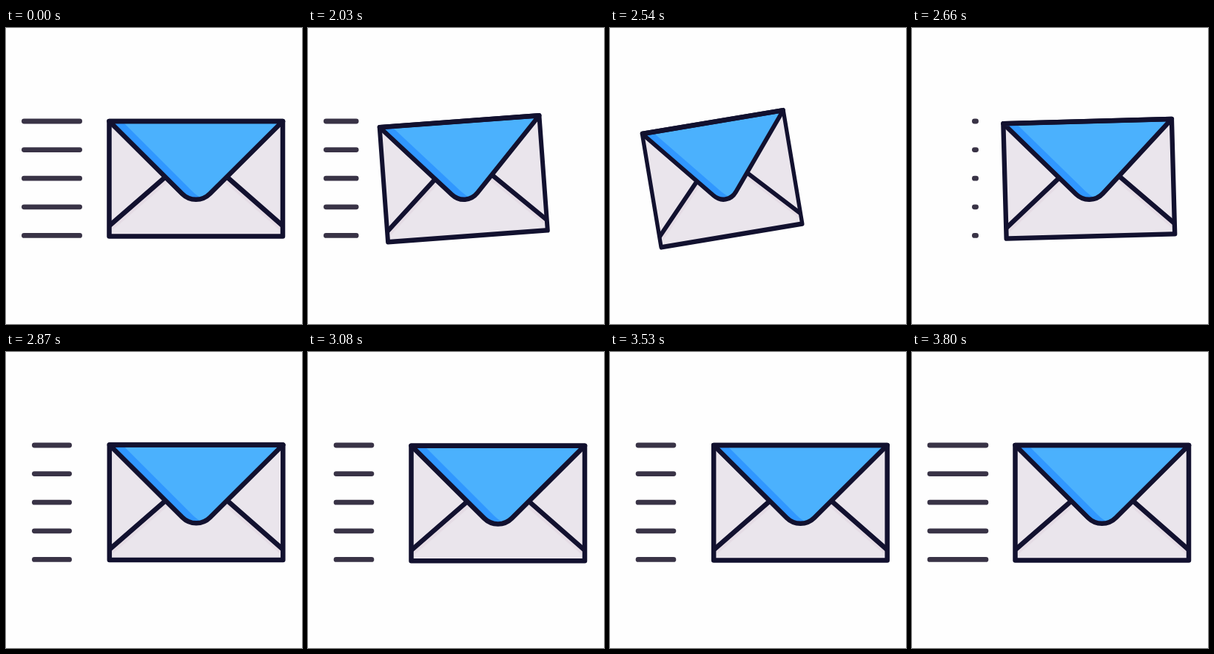
An HTML page that plays this animation: 400 by 400 pixels, repeating every 3830 ms.

```html
<!DOCTYPE html>
<html lang="en">
<head>
<meta charset="utf-8">
<title>Sending mail</title>
<style>
  html, body { margin: 0; width: 100%; height: 100%; overflow: hidden; background: #fefefe; }
  svg { display: block; width: 100vw; height: 100vh; }
  .ink { fill: none; stroke: #12112f; stroke-width: 6.5; stroke-linecap: round; stroke-linejoin: round; }
  .soft { fill: none; stroke: #e5dce5; stroke-width: 6; }
  #wind { fill: none; stroke: #393346; stroke-width: 6.8; stroke-linecap: round; }
</style>
</head>
<body>
<svg viewBox="0 0 400 400">
  <defs>
    <path id="flap" d="M139.5 126 L238 224 A26.5 26.5 0 0 0 275.5 224 L374 126 Z"/>
    <clipPath id="inFlap"><use href="#flap"/></clipPath>
  </defs>
  <path id="wind"/>
  <g id="mail">
    <rect x="139.5" y="126" width="234.5" height="155.5" fill="#eae5ec"/>
    <path class="soft" d="M143 270 L217 206 M371 270 L297 206"/>
    <path class="ink" d="M140.5 266.5 L214 202.5 M373 266.5 L300 202.5"/>
    <use href="#flap" fill="#3097ff"/>
    <path d="M157 126 L251.5 220.5 Q258 227 265 230 L300 232 L380 126 Z" fill="#4bb1fd" clip-path="url(#inFlap)"/>
    <use href="#flap" class="ink"/>
    <rect class="ink" x="139.5" y="126" width="234.5" height="155.5"/>
  </g>
</svg>
<script>
const LOOP = 3830, HOLD = 2030, STEP = 30;
const ENTER = 2660, END = 3800, CAP = 3.4;
const mail = document.getElementById('mail');
const wind = document.getElementById('wind');

const clamp = u => Math.min(1, Math.max(0, u));
const smooth = u => u * u * (3 - 2 * u);
const wave = (t, period) => 2 * Math.PI * t / period;
const gustIn = t => smooth(clamp((t - ENTER) / 180));

// How far the envelope is drawn back: quick ease out, then an S-curve home.
function pull(t) {
  if (t < HOLD) return 0;
  const back = 1 - .58 * Math.exp((HOLD - t) / 70);
  return back / (1 + Math.exp((t - 2616.5) / 26));
}

// Left and right ends of the speed lines: trimmed by the pull, later pulsing.
function windEnds(t) {
  if (t < ENTER) return [21, 21 + 82 * (1 - pull(t))];
  const g = gustIn(t);
  const mid = 85.5 - 23.5 * g;
  const pulse = 39 - 12 * Math.cos(wave(t - 3088, 217));
  const half = 4.5 + (pulse - 4.5) * g;
  return [mid - half, mid + half];
}

function draw(t) {
  const p = pull(t);
  const shake = .65 * gustIn(t) * clamp((END - t) / 100);
  const dx = -110.7 * p + shake * Math.sin(wave(t - 3080, 360));
  const dy = shake * Math.cos(wave(t - 3080, 360));
  mail.setAttribute('transform',
    `translate(${256.75 + dx} ${203.75 + dy}) rotate(${-10 * p}) scale(${1 - .185 * p} 1) translate(-256.75 -203.75)`);

  const [left, right] = windEnds(t);
  let d = '';
  for (let i = 0; i < 5 && right - left > 2 * CAP; i++) {
    d += `M${left + CAP} ${126 + 38.6 * i}H${right - CAP}`;
  }
  wind.setAttribute('d', d);
}

const start = performance.now();
function tick() {
  const t = (performance.now() - start) % LOOP;
  draw(t < HOLD ? 0 : HOLD + Math.floor((t - HOLD) / STEP) * STEP);
  requestAnimationFrame(tick);
}
tick();
</script>
</body>
</html>
```
